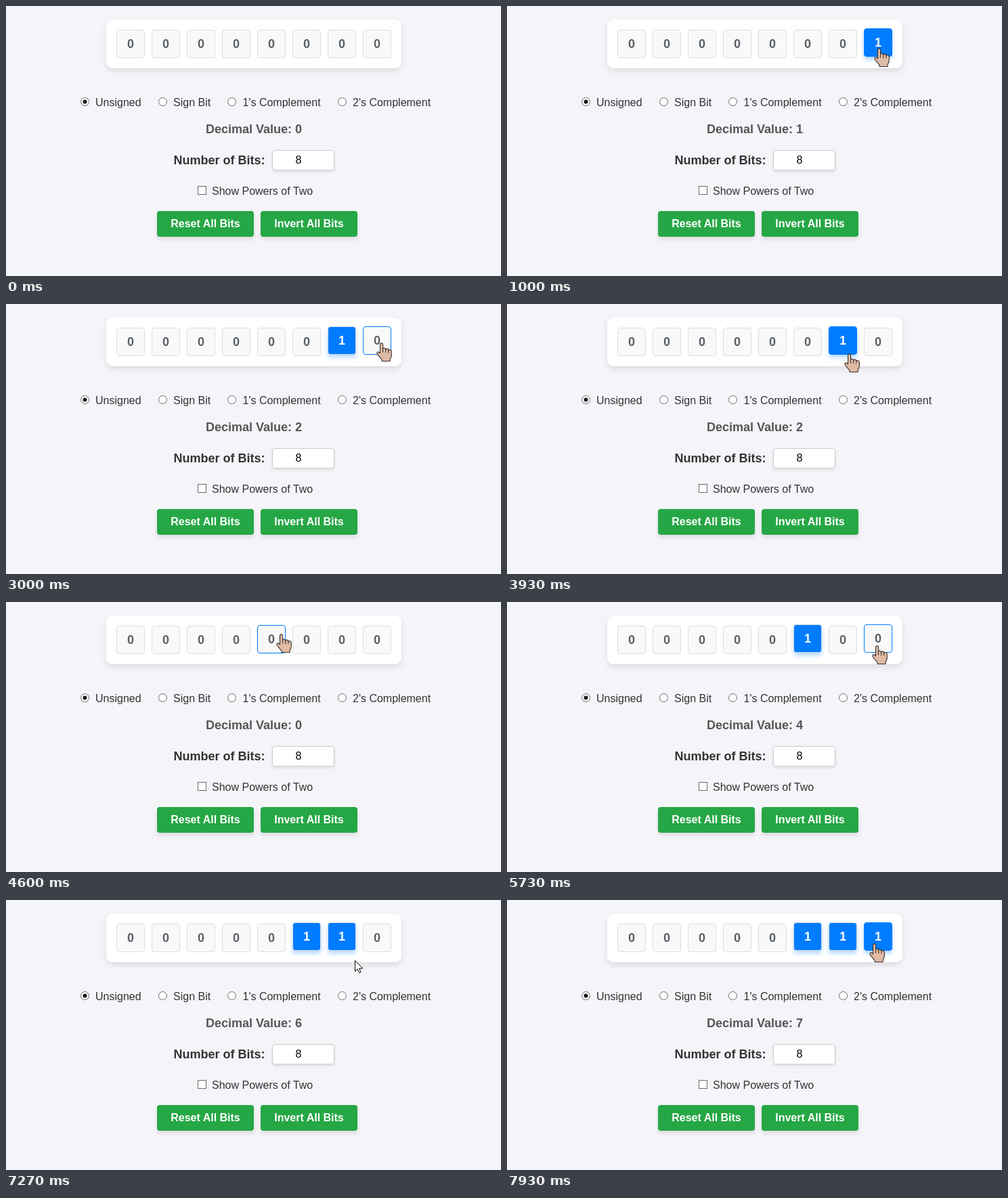
An HTML page that plays this animation: 731x399 px, repeating every 8000 ms.

```html
<!DOCTYPE html>
<html lang="en">
<head>
<meta charset="utf-8">
<title>Bit counter</title>
<style>
  html, body { margin: 0; width: 100%; height: 100%; overflow: hidden; background: #f4f4f9; }
  svg { display: block; width: 100%; height: 100%; }
  text { font: 16px "Liberation Sans", Arial, sans-serif; fill: #333; }
  .bold { font-weight: bold; }
  .big { font-weight: bold; font-size: 18px; }
  .mid { text-anchor: middle; }
  .ctl { fill: #fff; stroke: #6a6a6a; }
</style>
</head>
<body>
<svg id="stage" viewBox="0 0 731 399">
  <defs>
    <filter id="card" x="-10%" y="-30%" width="120%" height="170%">
      <feDropShadow dx="0" dy="4" stdDeviation="4" flood-color="#000" flood-opacity=".1"/>
    </filter>
    <filter id="soft" x="-10%" y="-40%" width="120%" height="190%">
      <feDropShadow dx="0" dy="2" stdDeviation="2" flood-color="#000" flood-opacity=".1"/>
    </filter>
    <filter id="raised" x="-10%" y="-40%" width="120%" height="190%">
      <feDropShadow dx="0" dy="4" stdDeviation="3" flood-color="#000" flood-opacity=".1"/>
    </filter>
    <filter id="glow" x="-30%" y="-30%" width="160%" height="170%">
      <feDropShadow dx="0" dy="4" stdDeviation="3" flood-color="#007bff" flood-opacity=".3"/>
    </filter>
  </defs>
  <rect width="731" height="399" fill="#f4f4f9"/>
  <rect x="148" y="20" width="436" height="72" rx="10" fill="#fff" filter="url(#card)"/>
  <g id="cells"></g>

  <g id="modes"></g>
  <circle cx="116.5" cy="141.5" r="3" fill="#1a1a1a"/>

  <text id="value" class="big" x="295" y="188" style="fill:#555"></text>
  <text class="big" x="247.5" y="234">Number of Bits:</text>
  <rect x="393.5" y="213.5" width="91" height="29" rx="3.5" fill="#fff" stroke="#ccc" filter="url(#soft)"/>
  <text class="mid" x="432" y="233" style="fill:#000">8</text>
  <rect class="ctl" x="283.5" y="266.5" width="12" height="12"/>
  <text x="304" y="279">Show Powers of Two</text>
  <g id="buttons"></g>

  <g id="cursor">
    <path id="arrow" d="M.5 .5V16.5L4.2 13L6.7 18.7L9.1 17.7L6.6 12H11.7Z" fill="#fff" stroke="#000"/>
    <g id="hand" transform="translate(1.5 1)" stroke="#3a302c" stroke-width="1.1" stroke-linejoin="round" stroke-linecap="round">
      <path fill="#dfbba6" d="M-2 1.6C-2-.7 2-.7 2 1.6V8C2.6 6.6 6.2 6.8 6.2 9.2C7 7.6 10.4 7.6 10.4 10.2C11.4 9 14.8 9.4 14.8 12V18C14.8 21 12.6 22 12.6 24V26.5H.6V24.5C-1 22-4.6 18.6-6.4 15.4C-7.6 13-4.6 11.6-2 14.6Z"/>
      <path fill="none" d="M2 8V13M6.2 9.2V13.4M10.4 10.2V13.8"/>
    </g>
  </g>
</svg>
<script>
const FPS = 15, TICKS = 120, LOOP = 8000, BITS = 8, SHOW = 6;
const $ = id => document.getElementById(id);
const smooth = u => u * u * (3 - 2 * u);

function add(parent, tag, attrs, text = '') {
  const el = document.createElementNS('http://www.w3.org/2000/svg', tag);
  for (const k in attrs) el.setAttribute(k, attrs[k]);
  el.textContent = text;
  return parent.appendChild(el);
}

// Pointer moves: start and end tick, destination, downward sag on the way
const moves = [
  [5, 14, 548, 62, 0],
  [19, 29, 490, 69, 30],
  [35, 44, 553, 57, 52],
  [53, 61, 495, 60, 26],
  [62, 70, 401, 46, 0],
  [70, 73, 391, 98, 0],
  [73, 78, 443, 62, 0],
  [80, 85, 545, 64, 30],
  [90, 95, 528, 65, 0],
  [97, 99, 459, 56, 0],
  [99, 102, 497, 60, 0],
  [105, 114, 541, 64, 28]
];
// Each click flips the bit under the pointer
const clicks = [15, 19, 33, 48, 53, 62, 79, 88, 97, 103, 117];

function pointer(tick) {
  let x = 664, y = 140;
  for (const [start, end, toX, toY, sag] of moves) {
    if (tick <= start) break;
    const u = smooth(Math.min(1, (tick - start) / (end - start)));
    x += (toX - x) * u;
    y += (toY - y) * u + sag * 4 * u * (1 - u);
  }
  return [x, y];
}

const cellX = bit => 163 + 52 * (BITS - 1 - bit);
const bits = [...Array(BITS).keys()];

function hovered(tick) {
  const [x, y] = pointer(tick);
  return bits.findIndex(bit => x >= cellX(bit) && x <= cellX(bit) + 42 && y >= 33 && y <= 77);
}

// Play the loop through once; a cell takes two ticks to rise or fall
const track = [];
for (let tick = 0, value = 0, lift = bits.map(() => 0); tick < TICKS; tick++) {
  const over = hovered(tick);
  if (clicks.includes(tick)) value ^= 1 << over;
  lift = lift.map((l, bit) => {
    const up = over === bit || value >> bit & 1;
    return Math.min(1, Math.max(0, l + (up ? .5 : -.5)));
  });
  track.push({ over, value, lift });
}

const cells = bits.map(bit => {
  const g = add($('cells'), 'g', {}), x = cellX(bit);
  return {
    g,
    box: add(g, 'rect', { x: x + .5, y: 35.5, width: 41, height: 41, rx: 3.5 }),
    text: add(g, 'text', { x: x + 21, y: 62, class: 'big mid' })
  };
});

[[132, 'Unsigned'], [247, 'Sign Bit'], [349.5, "1's Complement"], [512, "2's Complement"]].forEach(([x, label]) => {
  add($('modes'), 'circle', { cx: Math.floor(x) - 15.5, cy: 141.5, r: 6, class: 'ctl' });
  add($('modes'), 'text', { x, y: 148 }, label);
});

['Reset All Bits', 'Invert All Bits'].forEach((label, i) => {
  const x = 223 + 153 * i;
  add($('buttons'), 'rect', { x, y: 303, width: 143, height: 38, rx: 4, fill: '#28a745', filter: 'url(#raised)' });
  add($('buttons'), 'text', { x: x + 71.5, y: 327, class: 'bold mid', style: 'fill:#fff' }, label);
});

function draw(tick) {
  const { over, value, lift } = track[tick];
  cells.forEach(({ g, box, text }, bit) => {
    const on = value >> bit & 1;
    g.setAttribute('transform', `translate(0 ${-2 * smooth(lift[bit])})`);
    box.setAttribute('fill', on ? '#007bff' : '#f9f9f9');
    box.setAttribute('stroke', over === bit ? '#007bff' : '#ddd');
    box.setAttribute('filter', on ? 'url(#glow)' : 'none');
    text.style.fill = on ? '#fff' : '#596067';
    text.textContent = on;
  });
  $('value').textContent = 'Decimal Value: ' + value;

  const [x, y] = pointer(tick).map(Math.round);
  $('cursor').setAttribute('transform', `translate(${x} ${y})`);
  $('cursor').style.display = tick < SHOW ? 'none' : '';
  $('hand').style.display = over < 0 ? 'none' : '';
  $('arrow').style.display = over < 0 ? '' : 'none';
}

function frame() {
  const ms = performance.now() % LOOP;
  draw(Math.floor(ms * FPS / 1000 + .06) % TICKS);
  requestAnimationFrame(frame);
}
frame();
</script>
</body>
</html>
```
